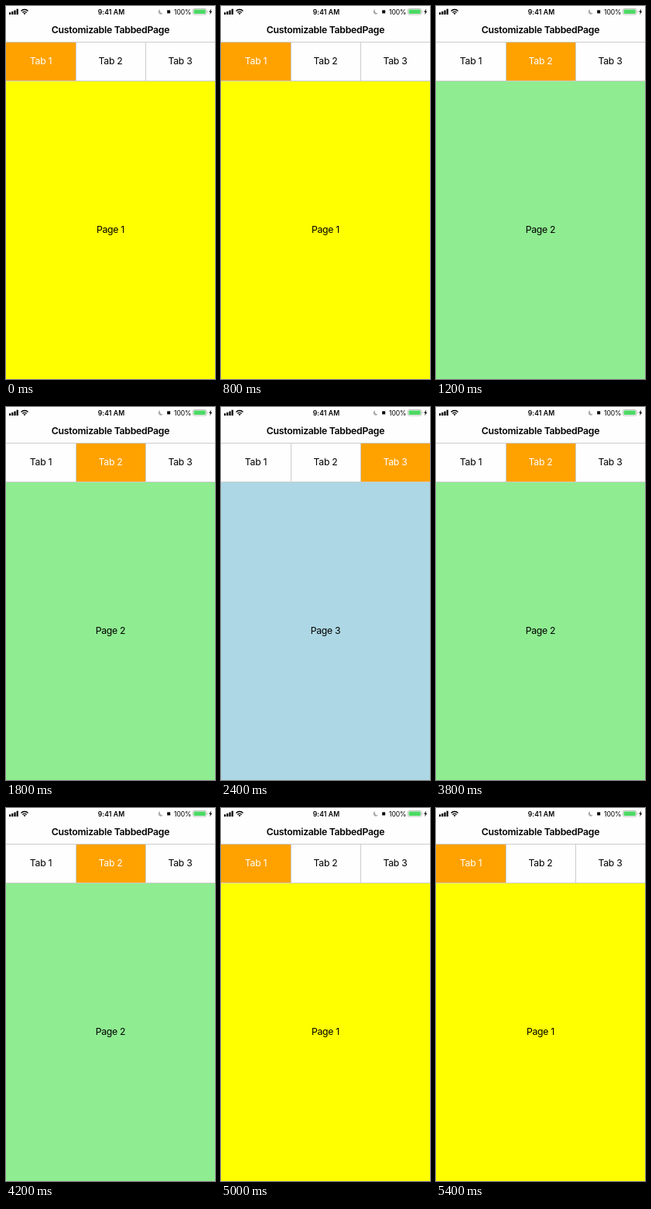
An HTML page that plays this animation: 270 by 480 pixels, repeating every 5.8 s.

```html
<!DOCTYPE html>
<html lang="en">
<head>
<meta charset="utf-8">
<title>Customizable TabbedPage</title>
<style>
  html, body { margin: 0; width: 100%; height: 100%; overflow: hidden; background: #fff; }
  svg { display: block; width: 270px; height: 480px; }
  text { font: 12.24px Inter, Roboto, sans-serif; letter-spacing: -.3px; text-anchor: middle; }
  .title { font-weight: 600; letter-spacing: -.26px; }
  .status { font-size: 8.64px; letter-spacing: -.15px; }
  .time { font-weight: 600; letter-spacing: .12px; }
</style>
</head>
<body>
<svg viewBox="0 0 270 480">
  <rect width="270" height="97" fill="#fefefe"/>

  <!-- Status bar -->
  <path d="M4 8.2h2.2v2.8H4zM7.2 7h2.2v4H7.2zM10.4 5.4h2.2V11h-2.2zM13.6 3.8h2.2V11h-2.2z"/>
  <g fill="none" stroke="#000" stroke-width="1.4">
    <path d="M19.5 6.4a6.4 6.4 0 0 1 9 0M21.4 8.4a3.7 3.7 0 0 1 5.2 0"/>
  </g>
  <path d="M24 11.2l-1.5-1.6a2.1 2.1 0 0 1 3 0z"/>
  <text class="status time" x="136" y="10.6">9:41 AM</text>
  <path d="M199.1 4.3a3.3 3.3 0 1 0 3.8 4.9a3.5 3.5 0 0 1-3.8-4.9z" fill="#aaa"/>
  <rect x="208.2" y="5.4" width="4" height="4"/>
  <text class="status" x="228.2" y="10.6">100%</text>
  <rect x="241.5" y="3.5" width="17.4" height="7.6" rx="1.8" fill="none" stroke="#aaa" stroke-width=".7"/>
  <rect x="242.6" y="4.6" width="15.2" height="5.4" rx="1" fill="#4cd964"/>
  <path d="M259.7 6a1.4 1.4 0 0 1 0 2.6z" fill="#aaa"/>
  <path d="M265.3 3.6l-3.1 4.2h1.8l-.9 3.4l3.2-4.4h-1.9z"/>

  <text class="title" x="135" y="34.6">Customizable TabbedPage</text>

  <!-- Tabs and page -->
  <rect id="mark" y="46" width="90" height="51" fill="#ffa200"/>
  <rect id="page" y="97" width="270" height="383"/>
  <path d="M0 46.5h270M0 96.5h270M90.5 46v51M180.5 46v51" stroke="#ccc" fill="none"/>
  <g id="tabs">
    <text x="45" y="75.3">Tab 1</text>
    <text x="135" y="75.3">Tab 2</text>
    <text x="225" y="75.3">Tab 3</text>
  </g>
  <text id="label" x="135" y="292.3"></text>
</svg>
<script>
  const LOOP = 5800;
  const COLORS = ['#ff0', '#8fec91', '#add7e4'];
  const STEPS = [[0, 0], [1200, 1], [2400, 2], [3800, 1], [5000, 0]]; // [start ms, tab]
  const [mark, tabs, page, label] = ['mark', 'tabs', 'page', 'label'].map(id => document.getElementById(id));
  const start = performance.now();
  let shown = -1;

  function select(tab) {
    shown = tab;
    mark.setAttribute('x', tab * 90);
    page.setAttribute('fill', COLORS[tab]);
    label.textContent = `Page ${tab + 1}`;
    [...tabs.children].forEach((t, i) => t.setAttribute('fill', i === tab ? '#fff' : '#000'));
  }

  function draw() {
    const time = (performance.now() - start) % LOOP;
    const tab = STEPS.filter(([from]) => from <= time).pop()[1];
    if (tab !== shown) select(tab);
    requestAnimationFrame(draw);
  }
  draw();
</script>
</body>
</html>
```
